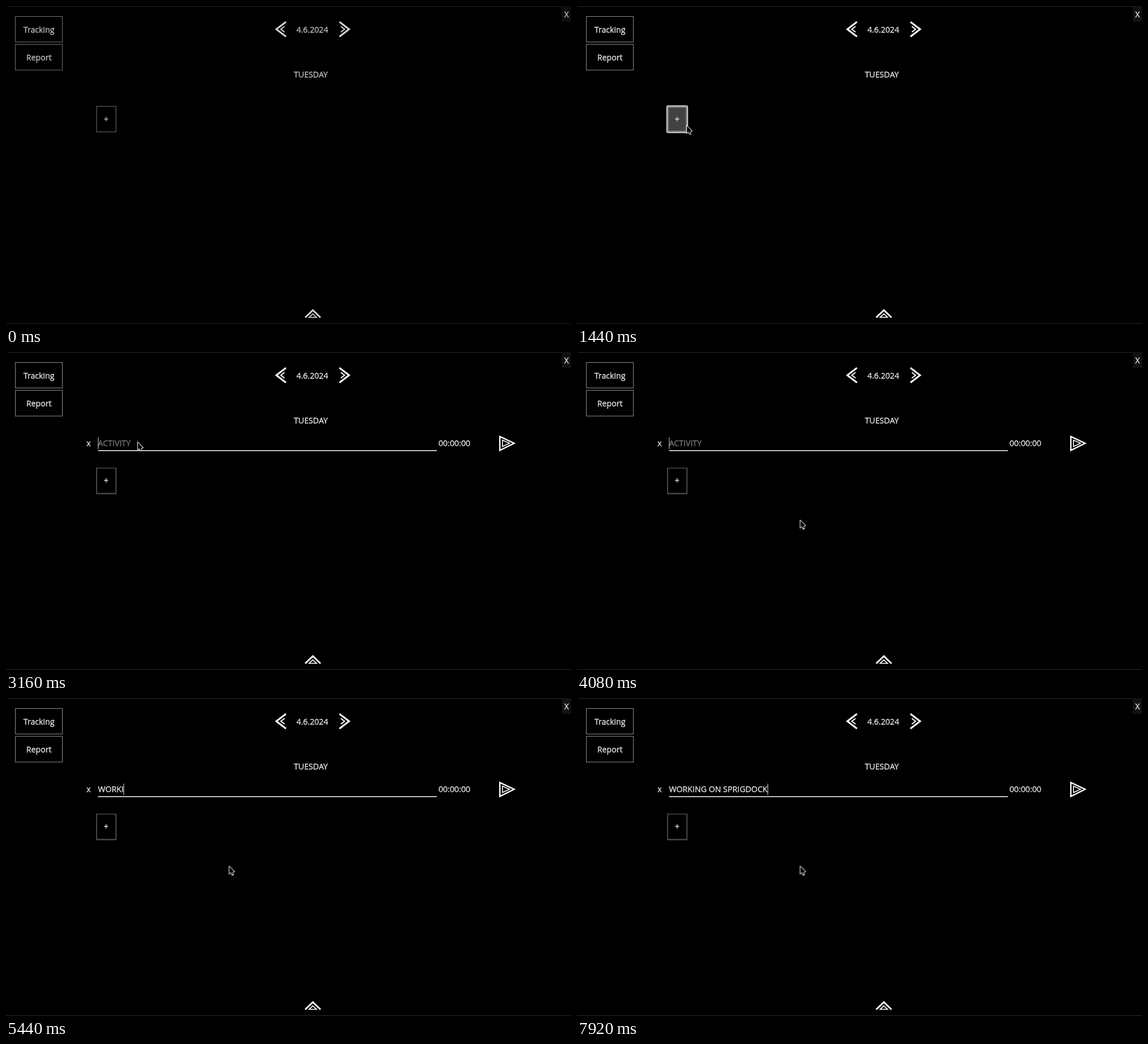
Write an HTML page that moves like this. It is 998x561 px and loops after 8 s.

```html
<!DOCTYPE html>
<html lang="en">
<head>
<meta charset="utf-8">
<title>Time tracker</title>
<style>
  html, body { margin: 0; width: 100%; height: 100%; overflow: hidden; background: #000; }
  svg { display: block; width: 100vw; height: 100vh; }
  text {
    font: 400 14.2px "Open Sans", "Noto Sans", sans-serif;
    fill: #e4e4e4; stroke: #e4e4e4; stroke-width: .35px; white-space: pre;
  }
  .mid { text-anchor: middle; }
  .hint { fill: #777; stroke: #777; }
  .box { fill: none; stroke: #8c8c8c; }
  .icon { fill: none; stroke: #fff; stroke-width: 3; }
  .thin { stroke-width: 1.6; }

  #app, #row, #add, #hover, #focus, #pointer { animation: 8s linear infinite; }
  #row, #add, #hover, #focus { animation-timing-function: step-end; }
  #app { animation-name: wake; }
  #row { animation-name: row; }
  #add { animation-name: add; }
  #hover { animation-name: hover; }
  #focus { animation-name: focus; }
  #pointer { animation-name: pointer; }

  @keyframes wake { 0%, .5% { opacity: .83 } 4%, 100% { opacity: 1 } }
  @keyframes row { 0% { visibility: hidden } 22.5%, 100% { visibility: visible } }
  @keyframes add { 0% { transform: none } 22.5%, 100% { transform: translateY(27.5px) } }
  @keyframes hover { 0% { opacity: 0 } 18% { opacity: 1 } 31.5%, 100% { opacity: 0 } }
  @keyframes focus { 0% { opacity: 0 } 38%, 100% { opacity: 1 } }
  @keyframes pointer {
    0%, 5.9% { transform: translate(700px, 300px); opacity: 0 }
    6% { transform: translate(700px, 300px); opacity: 1 }
    8.5% { transform: translate(653.5px, 257px); animation-timing-function: ease-in-out }
    19%, 31% { transform: translate(185px, 209px); animation-timing-function: ease-in-out }
    34.5%, 43.5% { transform: translate(232px, 158px); animation-timing-function: ease-in-out }
    50.5%, 100% { transform: translate(393.5px, 295.5px); opacity: 1 }
  }
</style>
</head>
<body>
<svg viewBox="0 0 998 561">
  <g id="app">
    <path d="M2 .5H982M0 560.5H998" stroke="#2b2b25"/>
    <rect x="982" width="16" height="28" fill="#121214"/>
    <text class="mid" x="990" y="20">X</text>

    <rect class="box" x="16.5" y="18.5" width="83" height="45"/>
    <rect class="box" x="16.5" y="67.5" width="83" height="45.5"/>
    <text class="mid" x="58.2" y="46.7">Tracking</text>
    <text class="mid" x="58.2" y="96">Report</text>

    <text class="mid" x="541" y="46.7">4.6.2024</text>
    <text class="mid" x="538.5" y="126.3">TUESDAY</text>

    <g id="chevrons" class="icon">
      <path d="M494.5 28L477.5 41L494.5 54"/>
      <path d="M492 36L485.5 41L492 46" stroke-width="2"/>
    </g>
    <use href="#chevrons" transform="matrix(-1 0 0 1 1083.5 0)"/>
    <path class="icon" d="M528.5 549.5L542 536.5L555.5 549.5"/>
    <path class="icon thin" d="M535.5 549.2L542 543.2L548.5 549.2Z"/>

    <g id="add">
      <rect class="box" x="160" y="177" width="34.2" height="45"/>
      <g id="hover">
        <rect x="159" y="176.5" width="36" height="46.5" rx="2" fill="#424242" stroke="#c9c9c9" stroke-width="2.4"/>
        <rect class="box" x="161.5" y="179" width="31" height="41.5"/>
      </g>
      <text class="mid" x="176.8" y="204.7">+</text>
    </g>

    <g id="row">
      <text class="mid" x="146" y="166.3">x</text>
      <text id="entry" x="162.5" y="166.3"></text>
      <text x="764" y="166.3">00:00:00</text>
      <path class="icon" d="M872.3 149.2L897.5 161L872.3 173.5Z" style="stroke-width: 2.4"/>
      <path class="icon thin" d="M877 155.5L889.5 161L877 166.8Z"/>
    </g>
    <g id="focus">
      <path d="M162.5 174H761" stroke="#fff" stroke-width="1.6"/>
      <path id="caret" d="M163 151V171" stroke="#dedede"/>
    </g>

    <path id="pointer" d="M.5 .7V15.2L3.6 12.6L5.5 16.4H8.2L7 12.2L10.6 10.8Z" fill="#000" stroke="#e4e4e4" stroke-width="1.1" stroke-linejoin="round"/>
  </g>
</svg>
<script>
  const message = "WORKING ON SPRIGDOCK";
  const keyTimes = [4800, 5000, 5120, 5280, 5440, 5560, 5720, 5880, 6040, 6200,
    6440, 6760, 7000, 7120, 7240, 7360, 7480, 7600, 7760, 7920];
  const frame = 40;
  const entry = document.getElementById("entry");
  const caret = document.getElementById("caret");
  const clock = document.getElementById("pointer").getAnimations()[0];
  let shown = -1;

  function draw() {
    const time = (clock.currentTime || 0) % 8000;
    // Look ahead less than one frame so a letter is painted when it is due.
    const count = keyTimes.filter(key => key < time + frame).length;
    if (count !== shown) {
      shown = count;
      entry.textContent = count ? message.slice(0, count) : "ACTIVITY";
      entry.classList.toggle("hint", !count);
      const width = count ? entry.getComputedTextLength() : 0;
      caret.setAttribute("transform", `translate(${Math.round(width)} 0)`);
    }
    requestAnimationFrame(draw);
  }
  draw();
</script>
</body>
</html>
```
